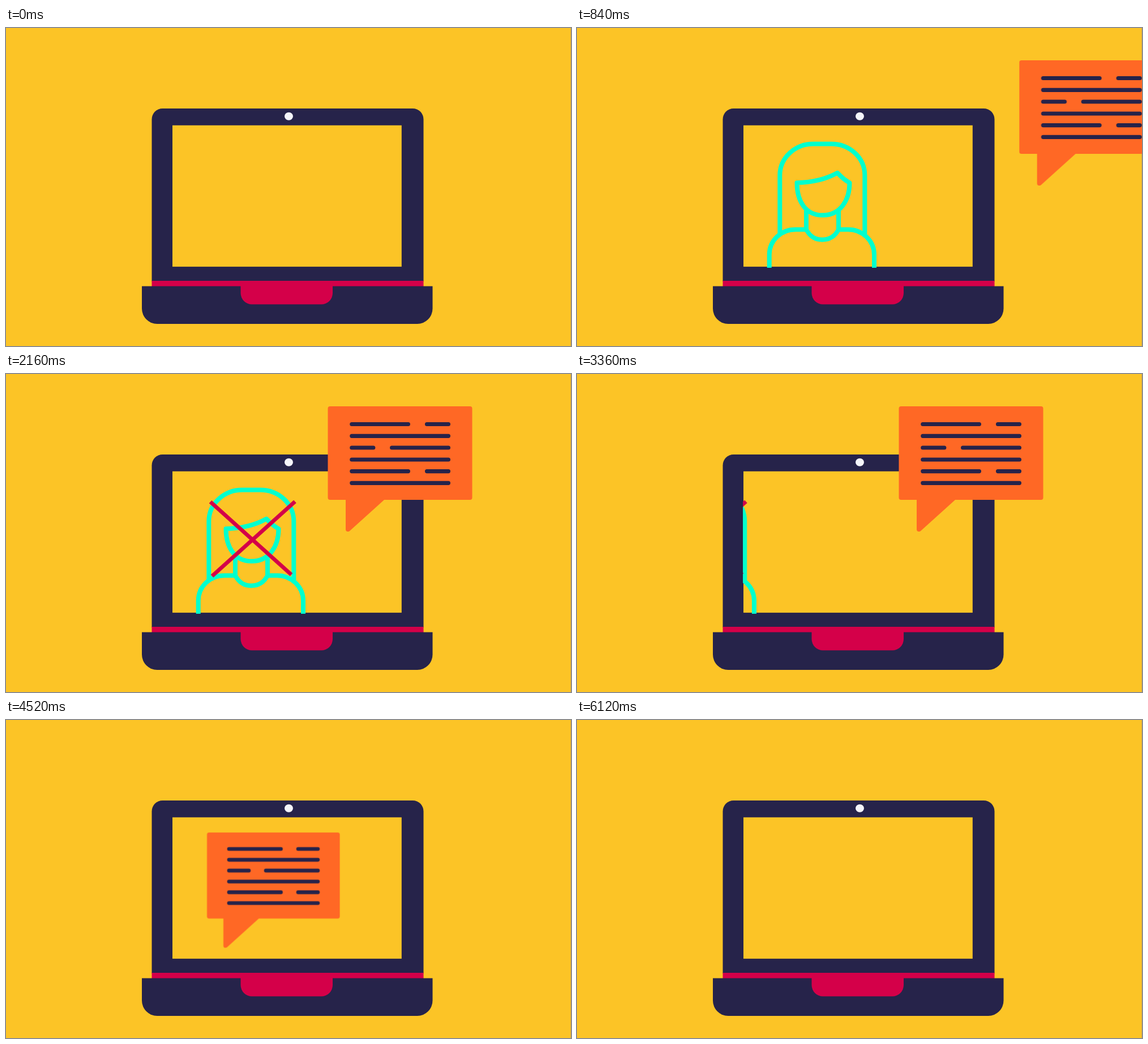
These frames come from a looping animation (998x561 px, 6160 ms). An HTML page:

```html
<!DOCTYPE html>
<html lang="en">
<head>
<meta charset="utf-8">
<title>Video call</title>
<style>
  :root {
    --navy: #26234a;
    --yellow: #fcc426;
    --red: #d40049;
    --orange: #ff6825;
    --mint: #00ffcd;
    --loop: 6160ms;
    --out: cubic-bezier(.333, 1, .667, 1);
  }
  html, body { margin: 0; width: 100%; height: 100%; overflow: hidden; background: var(--yellow); }
  svg { display: block; width: 100%; height: 100%; }

  .navy { fill: var(--navy); }
  .red { fill: var(--red); }
  .outline { fill: none; stroke: var(--mint); stroke-width: 8; stroke-linejoin: round; }
  .cross { fill: none; stroke: var(--red); stroke-width: 7; stroke-dasharray: 1 2; }
  .lines { fill: none; stroke: var(--navy); stroke-width: 7.2; stroke-linecap: round; }

  .person, .bubble-x, .bubble-y, .bubble, .cross { animation: var(--loop) var(--out) infinite; }
  .person { animation-name: person; }
  .bubble-x { animation-name: bubble-x; }
  .bubble-y { animation-name: bubble-y; }
  .bubble { animation-name: bubble-scale; transform-origin: 568.5px 57px; }
  .first { animation-name: first-stroke; }
  .second { animation-name: second-stroke; }

  @keyframes person {
    0% { transform: translateX(-270px); }
    9.74%, 50.65% { transform: none; }
    60.39%, 100% { transform: translateX(-270px); }
  }
  @keyframes first-stroke {
    0%, 24.03% { stroke-dashoffset: 1; }
    27.92%, 100% { stroke-dashoffset: 0; }
  }
  @keyframes second-stroke {
    0%, 27.92% { stroke-dashoffset: 1; }
    31.82%, 100% { stroke-dashoffset: 0; }
  }
  /* In from the right, into the screen, out to the left */
  @keyframes bubble-x {
    0%, 11.04% { transform: translateX(507px); }
    21.43%, 55.19% { transform: translateX(0); }
    71.75%, 90.26% { transform: translateX(-213.5px); }
    100% { transform: translateX(-533.5px); }
  }
  @keyframes bubble-y {
    0%, 55.19% { transform: translateY(0); }
    67.47%, 100% { transform: translateY(141.5px); }
  }
  @keyframes bubble-scale {
    0%, 55.19% { transform: scale(1); }
    69.95%, 100% { transform: scale(.92); }
  }
</style>
</head>
<body>
<svg viewBox="0 0 998 561">
  <defs>
    <clipPath id="screen"><rect x="293" y="171" width="406" height="252"/></clipPath>
    <clipPath id="right-of-bezel"><rect x="293" width="705" height="561"/></clipPath>
  </defs>

  <rect width="998" height="561" fill="#fcc426"/>
  <rect x="997.4" width=".6" height="561" fill="#b9985a"/>

  <!-- Laptop -->
  <path class="navy" d="M257.5 447V161a19 19 0 0 1 19-19H718.500a19 19 0 0 1 19 19V447Z"/>
  <rect x="294" y="171.700" width="404.800" height="249.400" fill="#fcc426"/>
  <ellipse cx="499.500" cy="155.800" rx="7.500" ry="7" fill="#f5f5fa"/>
  <rect class="red" x="257.500" y="446" width="480" height="10"/>
  <path class="navy" d="M240 455.500H753.500V495a27 27 0 0 1-27 27H267a27 27 0 0 1-27-27Z"/>
  <path class="red" d="M414.500 455H577V467.500a20 20 0 0 1-20 20H434.500a20 20 0 0 1-20-20Z"/>

  <g clip-path="url(#screen)">
    <g class="person">
      <g class="outline">
        <path d="M358.300 364V260C358.300 228 386 204.400 417 204.400H449C481 204.400 508.300 228 508.300 260V364"/>
        <path d="M388.500 273C416 272.500 441 266 460 255.500C466 262 473 268.500 481.500 273C481.500 304 465 330.300 434 330.300C404 330.300 388.500 306 388.500 273Z"/>
        <path d="M405 322V355.500C411 367 421 373.500 433 373.500C446 373.500 456 367 462 355.500V322"/>
        <path d="M339.700 424V400C339.700 375 360 355.500 386 355.500H405M462 355.500H479C504 355.500 525 375 525 400V424"/>
      </g>
      <path class="cross first" pathLength="1" d="M361 225.500L504 354"/>
      <path class="cross second" pathLength="1" d="M510.500 225L364 356.500"/>
    </g>
  </g>

  <g clip-path="url(#right-of-bezel)">
    <g class="bubble-x"><g class="bubble-y"><g class="bubble">
      <g fill="#ff6825">
        <rect x="568.500" y="57" width="255" height="165" rx="4"/>
        <path d="M600 220V274Q600 278 604 278Q606 278 607.500 276.500L668 222V220Z"/>
      </g>
      <path class="lines" d="M610.800 88.500H710.400M743.500 88.500H781.400
        M610.800 109.300H781.400
        M610.800 130H648.800M681.600 130H781.400
        M610.800 151H781.400
        M610.800 171.600H710.400M743.500 171.600H781.400
        M610.800 192.300H781.400"/>
    </g></g></g>
  </g>
</svg>
</body>
</html>
```
